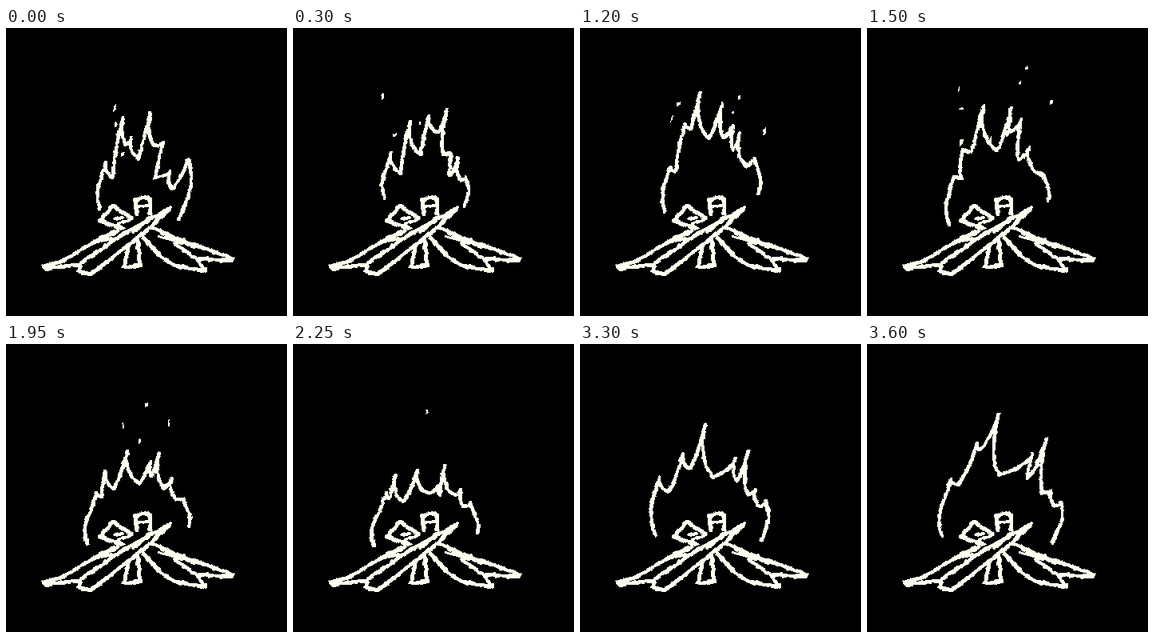
These frames come from a looping animation (352x360 px, 3750 ms). An HTML page:

```html
<!DOCTYPE html>
<html lang="en">
<head>
<meta charset="utf-8">
<title>Campfire</title>
<style>
  html, body { margin: 0; width: 100%; height: 100%; overflow: hidden; background: #000; }
  svg { display: block; width: 352px; height: 360px; }
  .ink { fill: none; stroke: #fffff0; stroke-width: 5; stroke-linecap: round; stroke-linejoin: round; shape-rendering: crispEdges; }
  #grain { stroke-width: 4; }
  #flame { stroke-width: 4.6; }
  #sparks { fill: #fffff0; stroke: none; }
</style>
</head>
<body>
<svg viewBox="0 0 352 360">
  <filter id="rough" filterUnits="userSpaceOnUse" x="0" y="0" width="352" height="360" color-interpolation-filters="sRGB">
    <feTurbulence type="fractalNoise" baseFrequency=".14" numOctaves="2" seed="4"/>
    <feDisplacementMap in="SourceGraphic" scale="4" xChannelSelector="R" yChannelSelector="G"/>
  </filter>
  <g class="ink" filter="url(#rough)">
    <path d="M140 253L104 271 72 291 47 298 49 301 90 296"/>
    <path d="M91 304L94 294 143 260 206 225 178 252 106 308Z"/>
    <path d="M158 238L134 222 117 241 147 251"/>
    <path d="M164 233L162 216 171 211 181 214 180 232"/>
    <path d="M172 262L196 288 212 297 250 304 238 288 212 270"/>
    <path d="M182 249L211 262 284 288 282 291 238 288"/>
    <path d="M153 274L148 299 168 297 165 266"/>
    <path id="grain" d="M165 223L180 222M136 239L146 237M140 245L156 239M120 266L146 260M160 255L182 235M192 260L236 273"/>
    <path id="flame"/>
    <path id="sparks"/>
  </g>
</svg>
<script>
const STEP = 150, STEPS = 25, RISE = 18, SPARKS = 28;

// Key points run from the left base to the right base, alternating tip and valley.
const poses = [
  pose(0, "118,226 125,168 134,187 147,111 151,146 157,137 166,163 181,106 186,147 197,143 187,187 205,179 208,201 228,164 217,239"),
  pose(2, "115,213 123,156 135,181 147,117 160,158 170,111 182,131 193,102 188,157 199,158 197,184 207,162 210,190 217,186 215,222"),
  pose(6, "110,212 117,162 122,172 143,88 147,97 155,65 160,122 176,89 180,144 190,130 194,140 197,113 202,163 215,140 220,200"),
  pose(10, "103,246 109,186 118,187 120,152 131,155 146,98 163,153 181,100 179,130 194,114 190,165 203,150 215,182 222,186 227,215"),
  pose(15, "101,252 117,186 121,194 128,164 138,197 156,158 169,187 181,178 185,188 190,152 203,189 210,182 213,203 222,199 231,236"),
  pose(19, "95,238 90,163 108,198 116,158 133,192 146,120 170,170 175,154 190,176 189,158 196,190 204,182 210,206 218,194 221,242"),
  pose(24, "94,240 105,169 113,176 138,124 141,132 165,88 165,163 207,137 201,168 225,118 220,186 230,184 236,202 243,198 232,248")
];

function pose(step, text) {
  return { step, points: text.split(" ").map(p => p.split(",").map(Number)) };
}

function pointsAt(step) {
  const next = Math.max(1, poses.findIndex(p => p.step >= step));
  const from = poses[next - 1], to = poses[next];
  const mix = (step - from.step) / (to.step - from.step);
  return from.points.map((p, i) => p.map((v, k) => v + (to.points[i][k] - v) * mix));
}

// Valleys are round, tips are pointed, and each tongue bends like a hook.
function flamePath(points) {
  const last = points.length - 1;
  let path = "M" + points[0];
  for (let i = 0; i < last; i++) {
    const tipFirst = i % 2 === 1;
    const [tip, foot] = tipFirst ? [points[i], points[i + 1]] : [points[i + 1], points[i]];
    const dx = tip[0] - foot[0], height = foot[1] - tip[1];
    const atBase = i === 0 || i === last - 1;
    const sway = (i === last - 1 ? 1 : -1) * 0.14 * height;
    const low = atBase ? [foot[0] + sway, foot[1] - height * 0.4] : [foot[0] + dx * 0.4 + sway / 2, foot[1] - height * 0.1];
    const high = [tip[0] + sway, tip[1] + height * 0.5];
    path += "C" + [...(tipFirst ? [high, low] : [low, high]), points[i + 1]].join(" ");
  }
  return path;
}

function seeded(seed) {
  return () => (seed = seed * 16807 % 2147483647) / 2147483647;
}

const random = seeded(2024);
const sparks = Array.from({ length: SPARKS }, (_, i) => ({
  birth: Math.floor(i * 13 / SPARKS),
  life: 2 + Math.floor(random() * 4),
  x: 108 + random() * 122,
  y: 95 + random() * 70,
  width: 2 + random() * 2,
  height: 3 + random() * 7
}));

function sparkPath(step) {
  return sparks.map(s => {
    const age = step - s.birth;
    if (age < 0 || age >= s.life) return "";
    const h = s.height * (1 - age / s.life / 2);
    return `M${s.x} ${s.y - age * RISE}l${s.width} ${-h / 3}v${h}l${-s.width} ${h / 3}z`;
  }).join("");
}

const start = performance.now();

function draw() {
  const step = Math.floor((performance.now() - start) / STEP) % STEPS;
  document.getElementById("flame").setAttribute("d", flamePath(pointsAt(step)));
  document.getElementById("sparks").setAttribute("d", sparkPath(step));
  requestAnimationFrame(draw);
}
draw();
</script>
</body>
</html>
```
